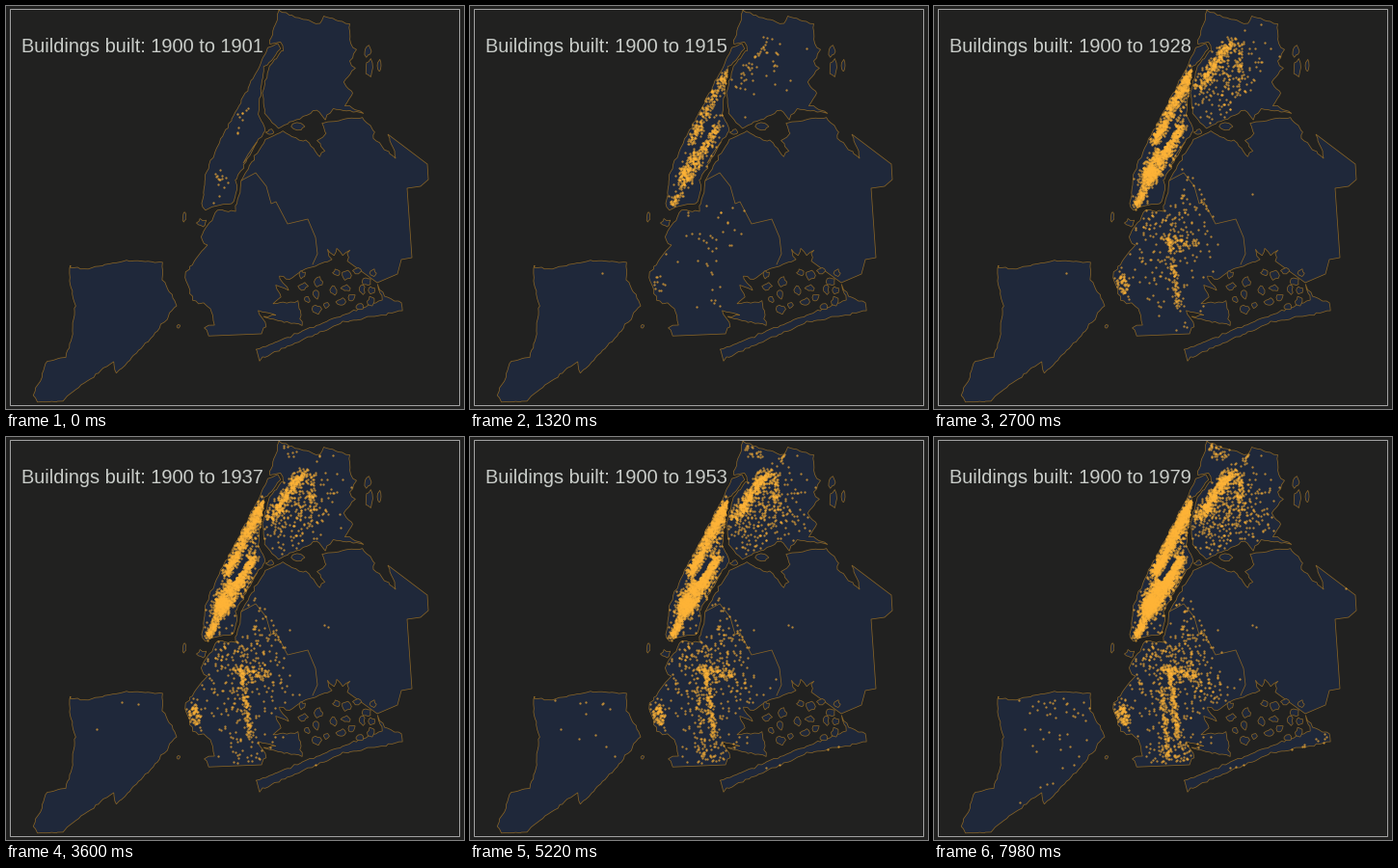
Animation, 475 px wide and 418 px high, one loop 8000 ms. Source, as a matplotlib script:

```python
import numpy as np
import matplotlib.pyplot as plt
from matplotlib.animation import FuncAnimation
from matplotlib.patches import Polygon, Rectangle
from matplotlib.path import Path

W, H, DPI = 475, 418, 100
LOOP, STEP = 8000, 40
PX = 72 / DPI
BACK, LAND, COAST, DOT = "#212120", "#1f283a", "#8a6526", "#ffb436"
rng = np.random.default_rng(19)

# Coastlines in pixels, y pointing down.
MANHATTAN = [
    (272, 43), (258, 72), (240, 107), (218, 148), (208, 171), (203, 204),
    (207, 212), (218, 207), (238, 203), (240, 191), (238, 181), (250, 158),
    (269, 129), (262, 112), (264, 85), (268, 64), (285, 45), (283, 39)]
BRONX = [
    (283, 5), (326, 19), (329, 10), (356, 19), (357, 39), (363, 46),
    (357, 57), (361, 65), (350, 80), (360, 91), (352, 103), (371, 111),
    (339, 107), (331, 117), (322, 108), (305, 116), (282, 127), (269, 112),
    (267, 85), (273, 62), (288, 45), (285, 37), (273, 40)]
NORTH_SHORE = [
    (244, 181), (258, 156), (270, 139), (288, 130), (304, 138), (314, 142),
    (325, 156), (330, 150), (323, 138), (332, 133), (327, 122), (340, 119),
    (370, 115), (382, 131), (381, 138), (405, 158), (396, 133)]
EAST_EDGE = [
    (437, 164), (438, 180), (430, 187), (416, 189), (421, 261), (410, 263),
    (406, 278), (385, 287)]
BAY_SHORE = [
    (354, 264), (356, 253), (349, 259), (343, 251), (340, 259), (333, 252),
    (337, 263), (310, 273), (294, 284), (283, 280), (293, 294), (280, 290),
    (285, 302), (277, 309), (303, 306), (307, 331), (267, 323), (280, 320),
    (262, 316), (270, 332), (265, 340)]
HARBOUR = [
    (211, 341), (206, 333), (215, 331), (212, 312), (193, 305), (186, 281),
    (190, 270), (208, 249), (202, 240), (219, 212), (238, 212), (243, 190)]
BORDER = [
    (244, 181), (259, 173), (270, 187), (275, 205), (280, 203), (292, 226),
    (313, 221), (321, 240), (323, 257), (318, 268)]
PENINSULA = [
    (260, 357), (315, 334), (390, 305), (386, 290), (393, 301), (410, 308),
    (411, 316), (350, 328), (300, 350), (262, 367)]
STATEN = [
    (67, 269), (78, 273), (125, 264), (162, 266), (163, 283), (177, 310),
    (150, 345), (115, 380), (111, 369), (72, 398), (58, 410), (33, 411),
    (28, 403), (35, 388), (42, 368), (62, 364), (69, 340), (72, 311),
    (66, 285)]
PARK = [(231, 147), (236, 150), (252, 126), (247, 123)]

# Small islands: centre and radii.
ISLETS = [
    (274, 131, 4, 3), (304, 125, 7, 4), (203, 225, 5, 4), (185, 219, 2, 5),
    (179, 332, 2, 2), (375, 47, 4, 6), (377, 64, 4, 9), (387, 62, 2, 6)]

# Building bands: x0, y0, x1, y1, spread, count.
FIRST = [(214, 198, 254, 100, 6, 17), (223, 180, 223, 180, 4, 10)]
OLD = [
    (228, 141, 267, 66, 2.9, 970), (224, 172, 224, 172, 4, 240),
    (209, 207, 222, 180, 2.4, 260), (240, 152, 256, 125, 2.9, 440),
    (220, 180, 240, 148, 5, 800)]
MIDDLE = [
    (248, 125, 264, 80, 5, 140), (274, 84, 308, 36, 3.4, 560),
    (284, 104, 325, 52, 12, 300), (214, 216, 280, 245, 13, 210),
    (236, 239, 272, 248, 2.4, 110), (244, 240, 253, 313, 1.7, 170),
    (193, 279, 198, 297, 3.8, 110), (212, 240, 264, 310, 18, 180),
    (252, 180, 275, 215, 10, 60), (316, 36, 317, 65, 1.8, 60)]
LATE = [
    (226, 155, 262, 72, 4.5, 260), (222, 182, 248, 138, 6, 420),
    (235, 260, 243, 333, 1.8, 100), (228, 327, 272, 326, 7, 90),
    (262, 252, 305, 268, 8, 50), (285, 10, 302, 20, 4, 45),
    (326, 13, 321, 28, 1.6, 22), (330, 100, 352, 70, 8, 45)]
NEWEST = [
    (95, 280, 162, 284, 9, 28), (90, 320, 160, 318, 12, 14),
    (80, 385, 150, 345, 6, 7), (300, 347, 408, 312, 2, 22)]
LONE = [(137, 277, 1913), (330, 195, 1924), (334, 197, 1930),
        (427, 157, 1972)]

# Share of each group standing by a given year.
GROWTH = [
    (FIRST, [1900, 1901], [0, 1]),
    (OLD, [1901, 1915, 1928, 1980], [0, 0.24, 0.64, 1]),
    (MIDDLE, [1904, 1915, 1928, 1940, 1980], [0, 0.07, 0.56, 0.75, 1]),
    (LATE, [1928, 1980], [0, 1]),
    (NEWEST, [1925, 1950, 1980], [0, 0.2, 1])]


def closed(points):
    return points + points[:1]


def roughen(points, size=0.7, gap=3.5):
    """Subdivide a line and shake the new points like a ragged shore."""
    out = []
    for a, b in zip(np.array(points[:-1], float), np.array(points[1:], float)):
        n = max(1, int(np.hypot(*(b - a)) / gap))
        k = np.arange(n)[:, None] / n
        out.append(a + (b - a) * k + rng.normal(0, size, (n, 2)))
    return np.vstack(out + [np.array(points[-1:], float)])


def islet(x, y, rx, ry):
    a = np.linspace(0, 2 * np.pi, 11)[:-1]
    r = rng.uniform(0.6, 1.2, 10)
    return np.column_stack([x + rx * r * np.cos(a), y + ry * r * np.sin(a)])


def marsh(count=20):
    """Scatter islets over the bay, keeping them apart."""
    found = []
    while len(found) < count:
        p = np.array([346, 295]) + rng.uniform(-1, 1, 2) * np.array([39, 21])
        if all(np.hypot(*(p - q)) > 9.5 for q in found):
            found.append(p)
    return [islet(*p, *rng.uniform(3, 5, 2)) for p in found]


def make_dots(shores):
    """Return dot positions sorted by year, and their years."""
    lone = np.array(LONE, float)
    spots, years = [lone[:, :2]], [lone[:, 2]]
    paths = [Path(s) for s in shores]
    park = Path(PARK)
    for bands, when, share in GROWTH:
        for x0, y0, x1, y1, spread, n in bands:
            k = rng.random((n, 1))
            p = np.array([x0, y0]) + k * np.array([x1 - x0, y1 - y0])
            p = p + rng.normal(0, spread, (n, 2))
            born = np.interp(rng.random(n), share, when)
            keep = np.any([s.contains_points(p) for s in paths], axis=0)
            keep &= ~park.contains_points(p)
            spots.append(p[keep])
            years.append(born[keep])
    spots, years = np.vstack(spots), np.concatenate(years)
    order = np.argsort(years, kind="stable")
    return spots[order], years[order]


def change_times():
    """The year advances every 120 ms, with a few half-length beats."""
    short = {420, 600, 2220, 3600, 4860, 6480, 7500}
    times = [0]
    while times[-1] < LOOP - 20:
        t = times[-1]
        times.append(t + (60 if t + 60 in short else 120))
    return np.array(times)


fig = plt.figure(figsize=(W / DPI, H / DPI), dpi=DPI, facecolor=BACK)
ax = fig.add_axes([0, 0, 1, 1])
ax.set(xlim=(0, W), ylim=(H, 0))
ax.axis("off")

island = np.vstack([roughen(NORTH_SHORE), EAST_EDGE,
                    roughen(BAY_SHORE), roughen(HARBOUR)])
main = [island] + [roughen(closed(s), 0.6)
                   for s in (MANHATTAN, BRONX, PENINSULA, STATEN)]
small = [islet(*i) for i in ISLETS] + marsh()
strait = np.array([(246, 163), (251, 154), (260, 141), (253, 155)])
for shore in main + small + [strait]:
    ax.add_patch(Polygon(shore, fc=LAND, ec=COAST, lw=0.75 * PX))
ax.plot(*np.array(BORDER).T, color=COAST, lw=0.75 * PX)
ax.add_patch(Rectangle((4.5, 3.5), 466, 411, fill=False, ec="#a2a2a2",
                       lw=PX, snap=False))

spots, born = make_dots(main)
dots, = ax.plot([], [], "o", ms=2.3 * PX, mew=0, color=DOT, alpha=0.65)
label = ax.text(15.5, 48, "", family="Liberation Sans", size=20 * PX,
                color="#c9cdc9", va="baseline", zorder=5)

CHANGES = change_times()
KEY_TIMES = [0, 1320, 2700, 3600, 5220, 6600, 7980]
KEY_YEARS = [1901, 1915, 1928, 1937, 1953, 1966, 1979]


def draw(i):
    now = i * STEP + STEP / 2
    t = CHANGES[CHANGES <= now][-1]
    year = round(float(np.interp(t, KEY_TIMES, KEY_YEARS)))
    n = np.searchsorted(born, year, side="right")
    dots.set_data(spots[:n, 0], spots[:n, 1])
    label.set_text(f"Buildings built: 1900 to {year}")
    return dots, label


anim = FuncAnimation(fig, draw, frames=LOOP // STEP, interval=STEP,
                     repeat=True, repeat_delay=0)
plt.show()
```
